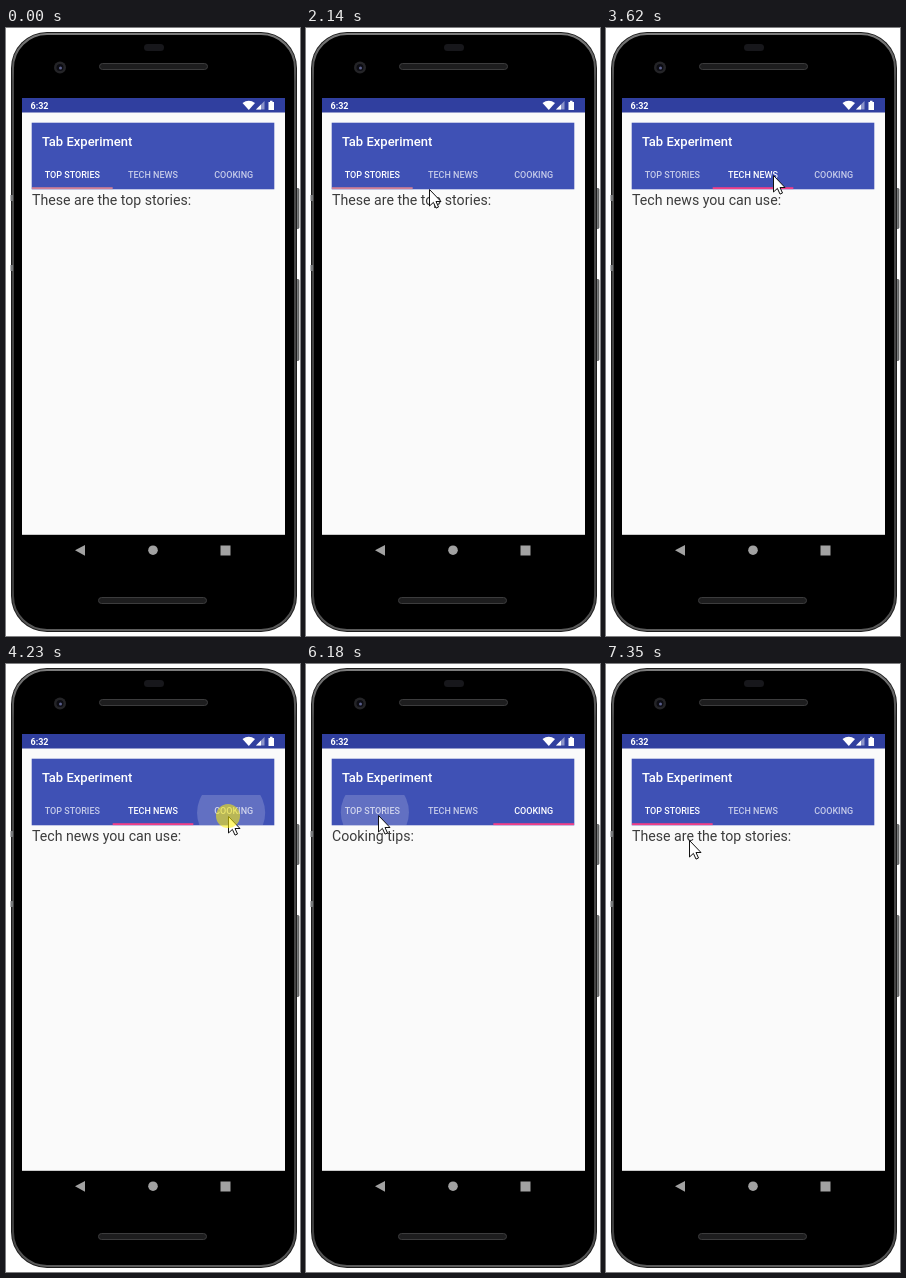
An HTML page that plays this animation: 294x608 px, repeating every 8000 ms.

```html
<!DOCTYPE html>
<html lang="en">
<head>
<meta charset="utf-8">
<title>Tabs on a phone</title>
<style>
  html, body { margin: 0; width: 100%; height: 100%; overflow: hidden; background: #fff; }
  svg { display: block; width: 294px; height: 608px; }
  text { font-family: Roboto, "Noto Sans", sans-serif; }
  .medium { font-weight: 500; fill: #fff; }
  .tab { font-size: 9px; text-anchor: middle; }
</style>
</head>
<body>
<svg viewBox="0 0 294 608">
  <defs>
    <linearGradient id="rim" x2="0" y2="1">
      <stop offset="0" stop-color="#7c7c7c"/>
      <stop offset=".08" stop-color="#4a4a4a"/>
      <stop offset=".93" stop-color="#3c3c3c"/>
      <stop offset="1" stop-color="#5c5c5c"/>
    </linearGradient>
    <clipPath id="tabClip"><rect id="tabArea" y="131" width="80.67" height="30"/></clipPath>
  </defs>

  <!-- phone -->
  <g fill="#77797a" stroke="#3a3a3a" stroke-width=".6">
    <rect x="289" y="160.5" width="4" height="40" rx="1"/>
    <rect x="289" y="251.5" width="4" height="81" rx="1"/>
  </g>
  <rect x="5" y="4" width="286" height="600" rx="36" fill="#1c1c1c"/>
  <rect x="7" y="6" width="282" height="596" rx="34" fill="#000" stroke="url(#rim)" stroke-width="2"/>
  <path d="M4.5 167h2.5v6h-2.5zM4.5 237h2.5v6h-2.5z" fill="#77797b"/>
  <rect x="138" y="16" width="20" height="7" rx="3.5" fill="#17171b"/>
  <g fill="#1d1d1e" stroke="#3c3c3d">
    <rect x="93.5" y="35.5" width="108" height="6" rx="3"/>
    <rect x="92.5" y="569.5" width="108" height="6" rx="3"/>
  </g>
  <circle cx="54" cy="39.5" r="6" fill="#242427"/>
  <circle cx="54" cy="39.5" r="3.5" fill="#0c0c12"/>
  <circle cx="54.5" cy="40" r="1.5" fill="#5a5f8c"/>

  <!-- screen -->
  <rect x="16" y="70" width="263" height="436.8" fill="#fafafa"/>
  <rect x="16" y="70" width="263" height="14.5" fill="#303f9f"/>
  <text class="medium" x="24.5" y="81" font-size="9" style="font-weight:700">6:32</text>
  <g fill="#fff">
    <path d="M236.5 75Q242.8 70.5 249 75L242.8 82Z"/>
    <path d="M250 81.5L258.5 73V81.5Z" opacity=".45"/>
    <path d="M250 81.5L255 76.5V81.5Z"/>
    <path d="M262.5 74h1.5v-1.2h2.5v1.2h1.5v8h-5.5z"/>
  </g>
  <g fill="#a2a2a2">
    <path d="M69 522.3L79 517V527.8Z"/>
    <circle cx="147" cy="522.2" r="4.8"/>
    <rect x="214.5" y="517.5" width="10" height="10"/>
  </g>

  <!-- app -->
  <rect x="25.7" y="94.7" width="242.6" height="66.6" fill="#3f51b5"/>
  <text class="medium" x="36" y="118" font-size="13">Tab Experiment</text>
  <circle id="ripple" fill="#fff" clip-path="url(#tabClip)"/>
  <g id="tabs"></g>
  <rect id="indicator" y="159.2" width="80.67" height="1.9"/>
  <text id="content" x="26" y="177" font-size="14.15" fill="#3c3c3c"></text>

  <path id="cursor" d="M0 0V16.5L3.9 12.9L6.5 18.6L9 17.5L6.5 12H11.5Z" fill="#fff" stroke="#111"/>
  <circle id="press" r="12" fill="#fff000" opacity=".55"/>
</svg>
<script>
const LOOP = 8000, TAB_W = 242 / 3;
const $ = id => document.getElementById(id);
const tabs = [
  ["TOP STORIES", "These are the top stories:"],
  ["TECH NEWS", "Tech news you can use:"],
  ["COOKING", "Cooking tips:"]
];
const tabLeft = i => 26 + i * TAB_W;
const tabMid = i => tabLeft(i) + TAB_W / 2;

// start, end, steps, path points (two: straight, three: quadratic)
const moves = [
  [520, 1220, 10, [247, 591], [175, 446], [125, 289]],
  [1600, 2220, 9, [125, 289], [82, 217], [134, 145]],
  [3460, 4010, 8, [134, 145], [222, 152]],
  [4940, 5550, 9, [222, 152], [74, 150]],
  [5720, 5720, 1, [74, 150], [72, 151]],
  [6730, 7030, 5, [72, 151], [83, 175]],
  [7180, 7180, 1, [83, 175], [83, 176]]
];
// start, end, from tab, to tab, frames with the press mark
const clicks = [
  [2600, 3060, 0, 1, 2],
  [4160, 4620, 1, 2, 2],
  [6100, 6560, 2, 0, 1]
];

const set = (el, attrs) => { for (const k in attrs) el.setAttribute(k, attrs[k]); };
const show = (el, on) => { el.style.display = on ? "" : "none"; };
const lerp = (a, b, p) => a + (b - a) * p;

function stepIndex(t, start, end, steps) {
  if (steps < 2) return 0;
  return Math.min(steps - 1, Math.floor((t - start) / ((end - start) / (steps - 1)) + 0.15));
}

// cubic-bezier(.4, 0, .2, 1)
function standardEase(x) {
  if (x <= 0) return 0;
  if (x >= 1) return 1;
  let lo = 0, hi = 1;
  for (let i = 0; i < 20; i++) {
    const u = (lo + hi) / 2, v = 1 - u;
    if (1.2 * v * v * u + 0.6 * v * u * u + u ** 3 < x) lo = u; else hi = u;
  }
  return lo * lo * (3 - 2 * lo);
}

function cursorAt(t) {
  const move = moves.filter(m => t >= m[0]).pop();
  if (!move) return null;
  const [start, end, steps, a, ...rest] = move;
  const b = rest[rest.length - 1];
  const i = stepIndex(t, start, end, steps);
  const p = move === moves[0] ? i / (steps - 1) : (i + 1) / steps;
  return [0, 1].map(k => rest.length < 2
    ? lerp(a[k], b[k], p)
    : lerp(lerp(a[k], rest[0][k], p), lerp(rest[0][k], b[k], p), p));
}

const labels = tabs.map(([name], i) => {
  const el = document.createElementNS("http://www.w3.org/2000/svg", "text");
  set(el, { class: "medium tab", x: tabMid(i), y: 150 });
  el.textContent = name;
  $("tabs").append(el);
  return el;
});

function render(t) {
  const tip = cursorAt(t);
  const click = clicks.filter(c => t >= c[0]).pop();
  let selected = 0, slide = 0, rippling = false;
  let pressed = t >= 7180 && t < 7350;

  if (click) {
    const [start, end, from, to, pressFrames] = click;
    const i = stepIndex(t, start, end, 7);
    const elapsed = i * (end - start) / 6;
    const p = i === 6 ? 1 : standardEase((elapsed - 175) / 300);
    selected = i >= 3 ? to : from;
    slide = lerp(from, to, p);
    pressed = pressed || i < pressFrames;
    rippling = i > 0 && i < 6;
    if (rippling) {
      const drift = Math.min(1, i * 0.55);
      set($("tabArea"), { x: tabLeft(to) });
      set($("ripple"), {
        cx: lerp(tip[0], tabMid(to), drift),
        cy: lerp(tip[1], 146, drift),
        r: 46 * (1 - Math.exp(-1.35 * i)),
        opacity: i < 4 ? 0.18 : i === 4 ? 0.14 : 0.06
      });
    }
  }

  show($("ripple"), rippling);
  set($("indicator"), { x: tabLeft(slide), fill: click ? "#f03f88" : "#d07f96" });
  labels.forEach((el, i) => set(el, { "fill-opacity": i === selected ? 1 : 0.7 }));
  $("content").textContent = tabs[selected][1];

  show($("cursor"), tip);
  show($("press"), tip && pressed);
  if (tip) {
    const [x, y] = tip.map(v => Math.floor(v + 0.01));
    set($("cursor"), { transform: `translate(${x + 0.5} ${y + 0.5})` });
    set($("press"), { cx: x, cy: y });
  }
}

const origin = performance.now();
function tick() {
  render((performance.now() - origin) % LOOP);
  requestAnimationFrame(tick);
}
tick();
</script>
</body>
</html>
```
